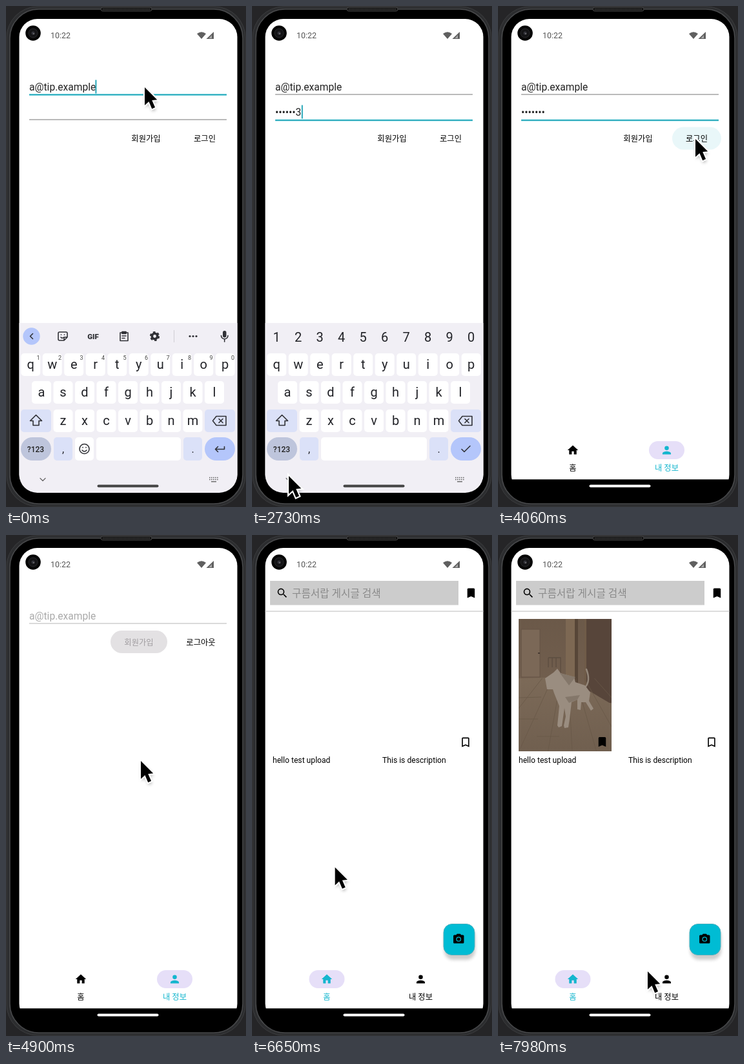
Recreate the animation shown at these times as an HTML page. Size 372 by 776 pixels, loop 8000 ms.

```html
<!DOCTYPE html>
<html lang="ko">
<head>
<meta charset="utf-8">
<title>Phone login</title>
<style>
html, body { margin: 0; width: 100%; height: 100%; overflow: hidden; background: #252527; }
svg { display: block; width: 372px; height: 776px; font-family: Roboto, "Noto Sans CJK KR", "Noto Sans CJK", "Noto Sans", sans-serif; }
.field { font-size: 15.6px; }
.btn { font-size: 12.3px; font-weight: 500; text-anchor: middle; }
.nav { font-size: 12.3px; text-anchor: middle; }
.caption { font-size: 12.15px; }
.key { font-size: 20px; text-anchor: middle; fill: #222328; }
.line { fill: none; stroke: #303136; stroke-width: 1.6; stroke-linejoin: round; stroke-linecap: round; }
</style>
</head>
<body>
<svg id="stage" viewBox="0 0 372 776"></svg>
<script>
const TEAL = '#14b6ce', LOOP = 8000, STEP = 70;
const ICON = {
  home: 'M10 20v-6h4v6h5v-8h3L12 3 2 12h3v8z',
  person: 'M12 12a4 4 0 1 0 0-8 4 4 0 0 0 0 8zm0 2c-2.67 0-8 1.34-8 4v2h16v-2c0-2.66-5.33-4-8-4z',
  mark: 'M17 3H7c-1.1 0-2 .9-2 2v16l7-3 7 3V5c0-1.1-.9-2-2-2z',
  search: 'M15.5 14h-.79l-.28-.27A6.47 6.47 0 0 0 16 9.5 6.5 6.5 0 1 0 9.5 16c1.61 0 3.09-.59 4.23-1.57l.27.28v.79l5 4.99L20.49 19zm-6 0a4.5 4.5 0 1 1 0-9 4.5 4.5 0 0 1 0 9z',
  camera: 'M9 2L7.17 4H4c-1.1 0-2 .9-2 2v12c0 1.1.9 2 2 2h16c1.1 0 2-.9 2-2V6c0-1.1-.9-2-2-2h-3.17L15 2H9zm3 14.7a4.700 4.700 0 1 1 0-9.400 4.700 4.700 0 0 1 0 9.400zm0-1.500a3.2 3.2 0 1 0 0-6.4 3.2 3.2 0 0 0 0 6.4z'
};
ICON.markOpen = ICON.mark + 'm0 15l-5-2.18L7 18V5h10v13z';

const rect = (x, y, w, h, r, fill, more = '') =>
  `<rect x="${x}" y="${y}" width="${w}" height="${h}" rx="${r}" fill="${fill}" ${more}/>`;
const text = (x, y, s, more = '') => `<text x="${x}" y="${y}" ${more}>${s}</text>`;
const icon = (name, x, y, more = '', k = .82) =>
  `<path d="${ICON[name]}" fill-rule="evenodd" transform="translate(${x - 12 * k} ${y - 12 * k}) scale(${k})" ${more}/>`;
const line = (d, more = '') => `<path class="line" d="${d}" ${more}/>`;
const group = (id, body) => `<g id="${id}">${body}</g>`;

function keyboard() {
  const soft = '#dbe1f8', strong = '#b4c6fb';
  const keyX = (start, i) => start + 33.5 * i;
  const row = (letters, start, y) => [...letters].map((c, i) =>
    rect(keyX(start, i) - 15, y, 30, 35, 5, '#fff') + text(keyX(start, i), y + 23.5, c, 'class="key"')).join('');
  const digits = (start, y, more) => [...'1234567890'].map((c, i) => text(keyX(start, i), y, c, more)).join('');

  const tools = `<circle cx="39.5" cy="511.5" r="13.2" fill="${strong}"/>` + line('M41.5 507.5l-4 4 4 4') +
    line('M83 505h10a2 2 0 0 1 2 2v6l-5 5h-7a2 2 0 0 1-2-2v-9a2 2 0 0 1 2-2zM95 513h-5v5M85 513q2 2.500 4 .5M85.500 509v.3M90.500 509v.3') +
    text(135, 515.5, 'GIF', 'text-anchor="middle" font-size="11.500" font-weight="900" fill="#303136"') +
    line('M177 506h12v12.500h-12zM180 504.500h6v3h-6zM180 511h6M180 514.500h4') +
    '<g fill="none" stroke="#303136"><circle cx="230.500" cy="511.500" r="4.200" stroke-width="3.600"/><circle cx="230.500" cy="511.500" r="6.400" stroke-width="2.400" stroke-dasharray="3.500 3.200"/></g>' +
    rect(260, 502, 1, 19, 0, '#cfcdd4') +
    [285, 290, 295].map(x => `<circle cx="${x}" cy="511.500" r="1.600" fill="#303136"/>`).join('') +
    rect(336, 503, 5.5, 10.5, 2.7, '#303136') + line('M333.500 510.500a5.200 5.200 0 0 0 10.500 0M338.700 516v4') +
    digits(50, 547.5, 'font-size="9" text-anchor="middle" fill="#444"') +
    rect(107, 668, 29, 36, 5, '#fff') +
    line('M129 686a7.500 7.500 0 1 1-15 0 7.500 7.500 0 0 1 15 0zM118 688q3.500 4 7 0M119 683.500v.5M124 683.500v.5') +
    rect(140, 668, 131, 36, 5, '#fff') + line('M338.500 682.500v4h-14m4-4l-4 4 4 4');
  const numbers = digits(38, 520, 'class="key"') + rect(107, 668, 164, 36, 5, '#fff') + line('M325 686.500l4 4 9-9');

  return rect(20, 491, 339, 270, 0, '#f1eff5') +
    row('qwertyuiop', 38.2, 538) + row('asdfghjkl', 55, 581) + row('zxcvbnm', 88.5, 625) +
    rect(23, 625, 47, 35, 5, soft) + line('M46.500 633.500l9 9h-4.500v7h-9v-7h-4.500z') +
    rect(308, 625, 47, 35, 5, soft) + line('M326 635.500h15v14h-15l-5.500-7zM330 639.500l6 6M336 639.500l-6 6') +
    rect(23, 668, 47, 36, 18, '#bec5dc') + text(46, 690.5, '?123', 'text-anchor="middle" font-size="12" font-weight="500" fill="#222"') +
    rect(74, 668, 29, 36, 5, soft) + text(88.5, 692, ',', 'class="key" style="font-size:16px"') +
    rect(275, 668, 29, 36, 5, soft) + text(289.5, 692, '.', 'class="key" style="font-size:16px"') +
    rect(308, 668, 47, 36, 18, strong) + group('tools', tools) + group('numbers', numbers) +
    line('M53 731.500l4 4 4-4', 'style="stroke:#666;stroke-width:1.200"') +
    '<path d="M315 730.500h14M315 733.500h14" stroke="#666" stroke-width="1.500" stroke-dasharray="1.600 1.400"/>' + rect(318, 736, 8, 1.4, 0, '#666');
}

function photo() {
  const planks = [-70, -35, -5, 20, 45, 75, 110].map(d => `M${100 + d * .45} 222L${85 + d * 1.5} 335`).join('');
  return '<g clip-path="url(#photoClip)">' + rect(32, 130, 144, 205, 0, 'url(#wall)') +
    rect(36, 146, 29, 74, 0, '#7b6857', 'stroke="#655344"') + rect(62, 182, 3, 2, 0, '#463a32') +
    rect(105, 130, 18, 106, 0, '#7d6853') + rect(119, 130, 5, 110, 0, '#574638') +
    rect(134, 130, 42, 130, 0, '#57453a') + rect(134, 130, 3, 122, 0, '#6f5b48') +
    '<path d="M32 222L105 220 176 262V335H32z" fill="url(#floor)"/>' +
    `<path d="${planks}M32 252l35-1M32 285h30M60 312h35" stroke="#695848" stroke-width=".8" fill="none"/>` +
    '<path d="M78 190h19v29M78 190v15M84 190v15M90 190v15" stroke="#5c4d40" stroke-width="1.300" fill="none"/>' +
    '<path d="M135 236q9-10 2-28" stroke="#94877a" stroke-width="2.500" fill="none" stroke-linecap="round"/>' +
    '<path d="M73 222l13-9 6-6 5 7 21 6 2 8 15 5 8 11-2 13 7 12-4 3-8-13-7 0-1 12-5-1 0-15-9 4-3 26-2 13-6 1-1-4 3-14-2-13-4 28-5 2-2-3 3-30-8-20-2-6-9 0z" fill="#9a8d80"/>' +
    '<path d="M96 214l14 19 10-13zM104 251l23-3-4 7-13 5z" fill="#84776a"/></g>' + icon('mark', 161.5, 320.5);
}

const gradient = (id, top, bottom) => `<linearGradient id="${id}" x2="0" y2="1">
  <stop stop-color="${top}"/><stop offset="1" stop-color="${bottom}"/></linearGradient>`;

document.getElementById('stage').innerHTML = `
<defs>
  <clipPath id="screenClip"><rect x="20.500" y="20" width="338" height="734" rx="28"/></clipPath>
  <clipPath id="photoClip"><rect x="32" y="130" width="144" height="205"/></clipPath>
  <filter id="soft" x="-50%" y="-50%" width="200%" height="200%"><feGaussianBlur stdDeviation="2.500"/></filter>
  ${gradient('wall', '#6b5949', '#786453')}${gradient('floor', '#7c6a58', '#705f4f')}
</defs>` +
  rect(0, 0, 372, 776, 0, '#252527') + rect(1, 1, 370, 774, 48, '#2c2d2f', 'stroke="#3c3d3f"') +
  rect(6, 5, 361, 766, 45, '#000', 'stroke="#48494b" stroke-width="1.500"') +
  rect(147, 2, 79, 6, 3, '#111', 'stroke="#444"') +
  '<path d="M150 5h73" stroke="#3c3c3c" stroke-width="3" stroke-dasharray="1 1"/>' +
  '<g clip-path="url(#screenClip)">' + rect(20, 20, 339, 713.5, 0, '#fff') +
  group('login',
    text(36, 130.5, 'a@tip.example', 'class="field" fill="#222"') +
    '<text id="password" class="field" x="36" y="169.500" fill="#222"></text>' +
    group('emailFocus', rect(36, 136, 306, 3, 0, '#a5eaf2') + rect(36, 136.5, 306, 1.8, 0, '#25a6b8')) +
    group('emailIdle', rect(36, 136.5, 306, 1, 0, '#777')) +
    group('passFocus', rect(36, 175.5, 306, 3, 0, '#a5eaf2') + rect(36, 176, 306, 1.8, 0, '#25a6b8')) +
    group('passIdle', rect(36, 175.5, 306, 1, 0, '#777')) +
    rect(0, 0, 1.8, 21, 0, '#149fb2', 'id="caret"') +
    rect(270, 187.5, 76, 35, 17.5, '#d4eff3', 'id="ripple"') +
    text(217, 209.5, '회원가입', 'class="btn"') + text(308, 209.5, '로그인', 'class="btn"')) +
  group('profile',
    text(36, 130.5, 'a@tip.example', 'class="field" fill="#a9a9a9"') + rect(36, 136.5, 306, 1, 0, '#b5b5b5') +
    rect(162, 148, 88, 35, 17.5, '#e3e1e3') + text(206, 170.5, '회원가입', 'class="btn" fill="#a09da0"') +
    text(302, 170.5, '로그아웃', 'class="btn"')) +
  group('home',
    rect(28, 71, 292, 37.5, 0, '#ccc') + icon('search', 47, 90) +
    text(62, 96, '구름서랍 게시글 검색', 'font-size="15.700" fill="#8a8a8a"') + icon('mark', 339.5, 90) +
    rect(20, 117.5, 339, 1.3, 0, '#ccc') +
    group('items',
      text(32, 353, 'hello test upload', 'class="caption"') +
      text(202, 353, 'This is description', 'class="caption"') + icon('markOpen', 331, 321)) +
    group('photo', photo()) +
    rect(298, 608, 48, 50, 14, '#000', 'opacity=".2" filter="url(#soft)"') +
    rect(297, 602.5, 48, 48, 13, '#00bcd4', 'stroke="#4fb0be"') + icon('camera', 320.3, 626)) +
  rect(20, 733.5, 339, 30, 0, '#000') +
  rect(-27.5, -14, 55, 28, 14, '#e6dff8', 'id="homePill"') + rect(-27.5, -14, 55, 28, 14, '#e6dff8', 'id="infoPill"') +
  group('homeTab', icon('home', 116, 688) + text(116, 719.5, '홈', 'class="nav"')) +
  group('infoTab', icon('person', 261.5, 688) + text(261.5, 719.5, '내 정보', 'class="nav"')) +
  group('keys', keyboard()) + rect(141.5, 741.5, 95, 4, 2, '#444', 'id="handle"') +
  text(69, 50, '10:22', 'font-size="12.450" fill="#555"') +
  '<path d="M303 51l-7-8q7-5.500 14 0zM322 40v11h-11.500z" fill="#5f5f5f"/><path d="M319 45v5h-4.500z" fill="#aaa"/></g>' +
  '<circle cx="42" cy="42" r="11.800" fill="#050505"/><circle cx="42" cy="42" r="7" fill="#141416" stroke="#29292c"/><circle cx="42" cy="42" r="2.500" fill="#34343c"/><circle cx="43" cy="43" r="1" fill="#777"/>' +
  group('cursor', '<g transform="scale(1.070)">' +
    '<path d="M1 3V29l6-5.500 4.500 11 4.500-2-4.500-10.500 7.500-.5z" opacity=".35" filter="url(#soft)"/>' +
    '<path d="M0 0V26l6-5.500L10.500 31l4.500-2-4.500-10.300 7.500-.7z" stroke="#fff" stroke-width="4" paint-order="stroke"/></g>');

const el = {};
document.querySelectorAll('[id]').forEach(e => el[e.id] = e);
const set = (e, name, value) => e.setAttribute(name, value);
const fade = (e, value) => set(e, 'opacity', value);
const ramp = (t, a, b) => Math.min(1, Math.max(0, (t - a) / (b - a)));

// time, x, y of the pointer tip
const path = [
  [0, 215, 126], [1610, 215, 127], [1890, 309, 206], [1960, 307, 208], [2240, 49, 687], [2380, 49, 687],
  [2660, 57, 728], [2800, 57, 728], [3220, 165, 424], [3640, 306, 206], [4480, 306, 206], [4900, 209, 350],
  [5180, 112, 702], [5600, 122, 688], [6300, 122, 688], [6720, 130, 480], [7000, 153, 233], [7140, 153, 233],
  [7420, 300, 320], [7630, 314, 655], [7980, 232, 676]
];
function pointer(t) {
  const i = Math.max(1, path.findIndex(p => p[0] >= t));
  const [a, b] = [path[i - 1], path[i]], k = ramp(t, a[0], b[0]);
  return [a[1] + (b[1] - a[1]) * k, a[2] + (b[2] - a[2]) * k];
}

const typed = 'test123', typeTimes = [420, 490, 630, 840, 1260, 1330, 1400];

function draw(t) {
  const onPass = t >= 140, loggedIn = t >= 4410, atHome = t >= 6020;

  const count = typeTimes.filter(x => x <= t).length;
  const showLast = count && t < 2900;
  el.password.textContent = '•'.repeat(count - (showLast ? 1 : 0)) + (showLast ? typed[count - 1] : '');
  const since = t - Math.max(onPass ? 140 : 0, ...typeTimes.slice(0, count));
  set(el.caret, 'x', onPass ? 36.5 + (count ? el.password.getComputedTextLength() : 0) : 138.5);
  set(el.caret, 'y', onPass ? 153.5 : 114.5);
  fade(el.caret, since % 1000 < 500 ? 1 : 0);

  fade(el.emailFocus, onPass ? 0 : 1);
  fade(el.emailIdle, onPass ? 1 : 0);
  fade(el.passFocus, onPass ? 1 : 0);
  fade(el.passIdle, onPass ? 0 : 1);
  fade(el.tools, onPass ? 0 : 1);
  fade(el.numbers, onPass ? 1 : 0);
  fade(el.ripple, ramp(t, 3710, 3850) - ramp(t, 3920, 4200));
  fade(el.login, loggedIn ? 0 : 1);

  const hide = ramp(t, 2800, 3080);
  set(el.keys, 'transform', `translate(0 ${270 * hide * hide * (3 - 2 * hide)})`);
  set(el.handle, 'fill', t < 3400 ? '#444' : '#fff');

  const enter = ramp(t, 6010, 6300);
  fade(el.profile, !loggedIn || enter === 1 ? 0 : 1 - enter * .9);
  fade(el.home, enter);
  fade(el.items, t >= 6440 ? 1 : 0);
  fade(el.photo, t >= 6860 ? 1 : 0);

  const grow = ramp(t, 6060, 6300), press = ramp(t, 5670, 5880) * .35;
  set(el.homePill, 'transform', `translate(116 688) scale(${atHome ? .4 + .6 * grow : 1} 1)`);
  fade(el.homePill, atHome ? Math.min(1, .2 + grow * 3) : press);
  set(el.infoPill, 'transform', `translate(261.5 688) scale(${1 - .3 * grow} 1)`);
  fade(el.infoPill, Math.max(0, 1 - grow * 4.5));
  set(el.homeTab, 'fill', atHome ? TEAL : '#000');
  set(el.infoTab, 'fill', atHome ? '#000' : TEAL);

  set(el.cursor, 'transform', `translate(${pointer(t)})`);
}

const start = performance.now();
function tick() {
  const t = (performance.now() - start) % LOOP;
  draw(Math.floor(t / STEP) * STEP);
  requestAnimationFrame(tick);
}
tick();
</script>
</body>
</html>
```
